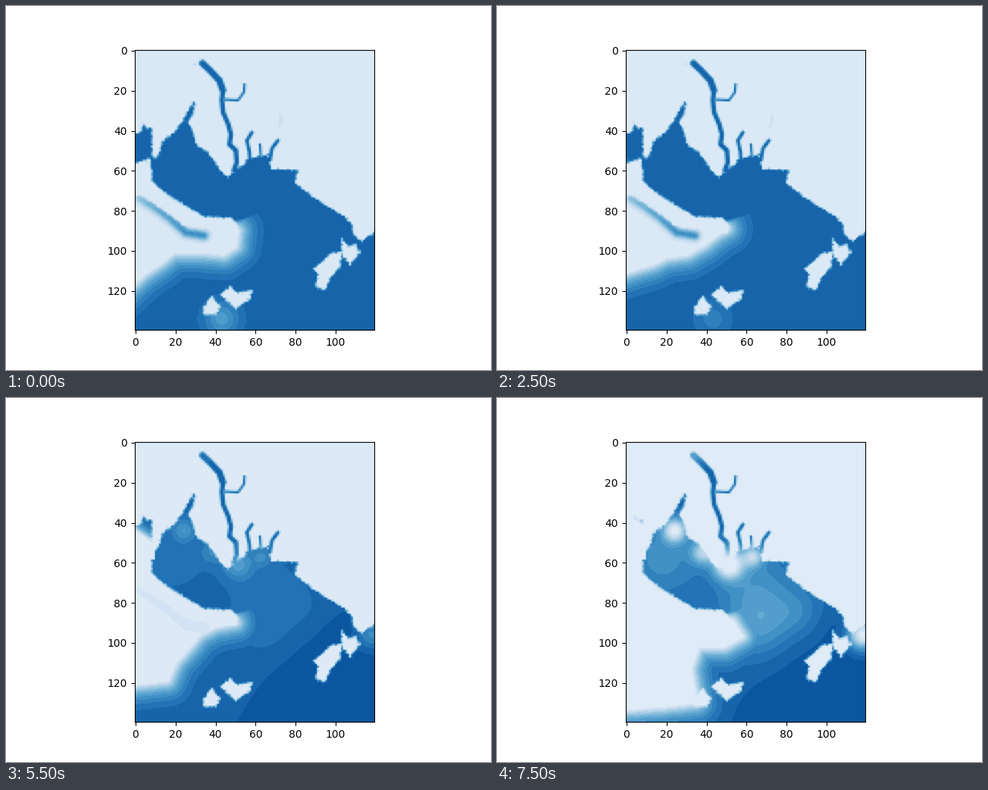
Write a matplotlib script that moves like this. It is 640 px wide and 480 px high and loops after 8 s.

```python
import numpy as np
import matplotlib.pyplot as plt
from matplotlib.animation import FuncAnimation
from matplotlib.colors import ListedColormap
from matplotlib.path import Path

COLS, ROWS = 120, 140
FRAMES, STEP = 16, 500
LEVELS = 14
FULL = 12          # level of open water at high tide
END = 7.5          # seconds at the last step

# Outlines in cell coordinates.
SHORE = [
    (28.8, 25.3), (29.5, 27), (28.8, 31), (26.5, 36), (28.8, 40.5),
    (30.3, 47.3), (36, 50.8), (41, 58.3), (45.8, 63.6), (48.5, 60.6),
    (53.8, 57), (56, 54), (66, 52), (67.8, 59.3), (81.4, 59.8),
    (79.2, 66), (83.3, 69), (89, 73.5), (96.6, 78.4), (104, 82.5),
    (108, 87), (108.7, 91.7), (112.5, 95.5), (116.7, 92.4), (126, 87),
    (126, 146), (-6, 146), (-6, 41.5), (2.7, 41), (3.4, 36.5),
    (5.3, 39), (8.3, 38.6), (8, 52), (9.5, 54), (11.4, 52),
    (13.3, 45.5), (19.7, 40.5), (23.5, 35),
]
BANK = [
    (-6, 59), (7, 54), (8.3, 65), (11.4, 69), (24.6, 77.6), (34.8, 83.3),
    (47.3, 83.7), (51, 87), (50.4, 91.7), (45, 90.5), (35, 89),
    (24.6, 88), (17, 82), (3.8, 73), (-6, 71),
]
ISLANDS = [
    [(103, 94), (106, 98), (110, 97), (112, 101), (107, 107), (103, 102)],
    [(103, 101), (98, 101), (89, 109), (91, 112), (90, 118), (94, 120),
     (97, 114), (102, 108)],
    [(34, 128), (38, 123), (42, 128), (40, 132), (34, 132)],
    [(42, 122), (47, 118), (51, 121), (58, 120), (57, 124), (50, 129)],
]

# Water courses: width and centre line.
CREEKS = [
    (3.4, [(33.3, 6.5), (37, 10), (41.7, 15), (43.5, 20)]),
    (2.4, [(43.5, 20), (43, 25), (43.6, 31), (46.2, 37), (47.5, 42),
           (46.8, 47), (50, 50), (50.4, 56), (49, 60)]),
    (1.2, [(43, 24.5), (51, 25), (54, 21), (54.3, 17)]),
    (1.8, [(58, 41), (55.5, 45), (56.8, 51), (57, 56)]),
    (1.2, [(62, 47), (62.5, 53)]),
    (1.8, [(71, 45), (68, 49), (67, 55)]),
]
DAMP = [[(29, 7), (32, 6.5)], [(72.5, 32), (72.5, 36), (71.5, 38)]]
CHANNEL = [(2, 74), (10, 79), (17, 84), (25, 91), (34, 92.5)]

# Seaward edge of the dry flats: key poses between which it glides.
POSE_TIMES = [0, 3, 5.5, END]
POSES = np.array([
    [(51, 90), (50, 98), (44, 102), (33, 101), (19, 101), (13, 106),
     (4, 112), (-9, 124)],
    [(50, 89), (44, 91), (38, 96), (30, 102), (20, 104), (13, 107),
     (4, 109), (-9, 112)],
    [(50, 90), (40, 92), (32, 96), (28, 101), (20, 110), (16, 119),
     (8, 120), (-9, 122)],
    [(53, 89), (58, 97), (49, 102), (36, 102), (32, 113), (35, 130),
     (18, 132), (-9, 134)],
])

# Shallows that emerge with the ebb: x, y, radius, final drop in level.
SHOALS = [
    (24, 44, 4, 11), (38, 55, 4, 8), (51, 61, 5, 13), (63, 57, 3.5, 8),
    (18, 58, 13, 3), (64, 73, 14, 3), (66, 93, 11, 3), (86, 86, 9, 2.2),
    (118, 96, 5, 13), (33, 6, 4, 4),
]

ys, xs = np.mgrid[0:ROWS, 0:COLS].astype(float)
ragged = np.random.default_rng(4).uniform(-0.4, 0.4, (ROWS, COLS))


def line_distance(points):
    best = np.full((ROWS, COLS), np.inf)
    for (x0, y0), (x1, y1) in zip(points, points[1:]):
        dx, dy = x1 - x0, y1 - y0
        along = ((xs - x0) * dx + (ys - y0) * dy) / (dx**2 + dy**2)
        along = np.clip(along, 0, 1)
        best = np.minimum(best, np.hypot(xs - x0 - along * dx,
                                         ys - y0 - along * dy))
    return best


def depth_inside(points):
    """Distance to the outline, negative outside it."""
    points = list(map(tuple, points))
    grid = np.column_stack([xs.ravel(), ys.ravel()])
    inner = Path(points).contains_points(grid).reshape(ROWS, COLS)
    return np.where(inner, 1, -1) * line_distance(points + points[:1])


def cover(distance):
    return np.clip(0.5 + distance + ragged, 0, 1)


def stroke(points, width):
    return np.clip(0.5 + width / 2 - line_distance(points), 0, 1)


def mound(x, y, r):
    return np.exp(-((xs - x)**2 + (ys - y)**2) / (2 * r**2))


def shelve(distance, scale):
    """Level rising from a waterline towards the open water."""
    return (FULL + 1) * (1 - np.exp(-np.maximum(distance, 0) / scale))


wet = cover(depth_inside(SHORE))
for outline in [BANK] + ISLANDS:
    wet = np.minimum(wet, 1 - cover(depth_inside(outline)))
for width, course in CREEKS:
    wet = np.maximum(wet, stroke(course, width))

shoals = sum(drop * mound(x, y, r) for x, y, r, drop in SHOALS)
offshore = 1 / (1 + np.exp(-(xs + 0.6 * (ys - 100) - 74) / 6))
offshore *= np.clip((ys - 72) / 20, 0, 1)
bank_line = np.interp(xs, [8, 34, 50, 62], [66, 82, 84, 78])
bay_side = FULL * np.clip((bank_line - ys) / 6 + 0.5, 0, 1)
inlet = (xs < 9.5) & (ys < 59)
channel = np.exp(-(line_distance(CHANNEL) / 2.6)**2)
channel *= np.interp(xs, [0, 25], [5, 9])
damp = sum(stroke(line, 1) for line in DAMP)


def flats_edge(t):
    k = min(np.searchsorted(POSE_TIMES, t, side="right"), len(POSES) - 1) - 1
    mix = (t - POSE_TIMES[k]) / (POSE_TIMES[k + 1] - POSE_TIMES[k])
    edge = POSES[k] + mix * (POSES[k + 1] - POSES[k])
    return [(-9, 60), (30, 86), *edge]


def surface(t):
    ebb = max(t - 3.2, 0)**2 / (END - 3.2)**2
    level = FULL - ebb * shoals
    level += offshore * np.clip((t - 2.5) / 2, 0, 1)
    level -= 4 * mound(43, 134, 6) * np.clip(1 - t / 5, 0, 1)

    flats = shelve(-depth_inside(flats_edge(t)), 6)
    flats = np.maximum(flats, channel * np.clip((6 - t) / 3, 0, 1))
    level = np.where(inlet, level, np.minimum(level, flats + bay_side))

    waterline = np.interp(t, [0, 2.5, 4.5, END], [64, 62, 48.5, 36])
    pool = shelve(waterline + 0.7 * xs - ys, 4)
    level = np.where(inlet, np.minimum(level, pool), level)

    level = wet * np.clip(level, 0, LEVELS - 1)
    return np.maximum(level, 2 * damp * (1 - t / 8))


def palette(t):
    land = np.interp(t, [0, END], [0.148, 0.12])
    return ListedColormap(plt.get_cmap("Blues")(np.linspace(land, 0.855, LEVELS)))


fig, ax = plt.subplots(figsize=(6.4, 4.8), dpi=100)
image = ax.imshow(surface(0), cmap=palette(0), vmin=-0.5, vmax=LEVELS - 0.5)


def update(i):
    t = i * STEP / 1000
    image.set_data(surface(t))
    image.set_cmap(palette(t))
    return [image]


anim = FuncAnimation(fig, update, frames=FRAMES, interval=STEP, repeat=True,
                     repeat_delay=0)
plt.show()
```
